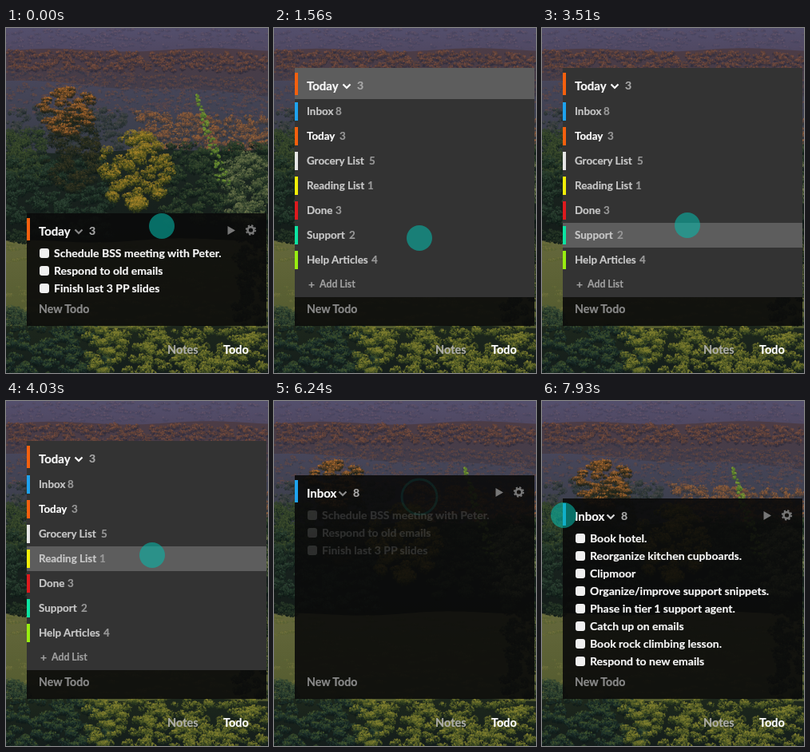
Write an HTML page with a canvas that moves like this. It is 328 px wide and 432 px high and loops after 8 s.

```html
<!DOCTYPE html>
<html lang="en">
<head>
<meta charset="utf-8">
<title>Todo lists</title>
<style>
html, body { margin: 0; width: 328px; height: 432px; overflow: hidden; background: #141c18; }
body { position: relative; font: 700 14px Lato, "Open Sans", sans-serif; color: #f8f8f8; }
canvas, svg, .abs, .t { position: absolute; }
canvas { left: 0; top: 0; }
.t { line-height: 20px; margin-top: -10px; white-space: nowrap; -webkit-text-stroke: .2px; }
#panel { left: 26px; width: 300px; overflow: hidden; background: rgba(10, 10, 10, .9); }
#todos, #menu, #head { left: 0; top: 0; width: 300px; }
.box { left: 16px; width: 12px; height: 12px; border-radius: 3px; background: #f0f0f0; }
#menu { height: 287px; background: #333; }
.row { left: 0; width: 100%; height: 31px; font-size: 13.4px; color: #c8c8c8; }
.row.on, #cap.on { background: #5d5d5d; }
.tag { left: 0; top: 4px; width: 4px; height: 23px; }
.num { color: #999; }
#cap { left: 0; top: 0; width: 100%; height: 39px; }
#strip { right: 0; top: 0; width: 13px; height: 100%; background: #141414; }
#bar { left: 0; top: 6px; width: 4px; height: 28px; }
#head { font-size: 15px; }
#count { font-size: 14px; color: #aaa; }
#dot, #ring { border-radius: 50%; box-sizing: border-box; transform: translate(-50%, -50%); }
#dot { width: 32px; height: 32px; background: rgba(5, 184, 170, .57); }
#ring { border: 3px solid rgb(5, 184, 170); }
.tab { top: 402.500px; font-size: 14.500px; }
</style>
</head>
<body>
<canvas id="scene" width="328" height="432"></canvas>
<div id="panel" class="abs">
  <div id="todos" class="abs"></div>
  <div class="t" id="add" style="left:15px;font-size:14.2px;color:#8a8a8a">New Todo</div>
  <svg id="icons" width="60" height="40" style="left:240px;top:0" fill="#777">
    <path d="M11.500 16V27L21 21.500Z"/>
    <g fill="none" stroke="#777">
      <circle cx="40.500" cy="21" r="3.900" stroke-width="2.600"/>
      <circle cx="40.500" cy="21" r="5.700" stroke-width="2" stroke-dasharray="2.240"/>
    </g>
  </svg>
  <div id="menu" class="abs"><div id="cap" class="abs"></div></div>
  <div id="strip" class="abs"></div>
  <div id="head" class="abs">
    <div id="bar" class="abs"></div>
    <div id="title" class="t" style="left:15px;top:22px"></div>
    <svg id="chev" width="12" height="8" style="top:19px" fill="none" stroke-width="2.200"><path d="M1.500 1.500L6 6L10.500 1.500"/></svg>
    <div id="count" class="t" style="top:22px"></div>
  </div>
</div>
<div class="t tab" style="left:202px;color:#adada8">Notes</div>
<div class="t tab" style="left:272px;color:#fff">Todo</div>
<div id="ring" class="abs"></div>
<div id="dot" class="abs"></div>
<script>
const $ = id => document.getElementById(id);
const LOOP = 8000, STEP = 130, BOTTOM = 373;
const OPEN = 1170, PICK = 5980;

// ---------- landscape ----------
const g = $('scene').getContext('2d');
let seed = 11;
const rnd = () => (seed = (seed * 16807) % 2147483647) / 2147483647;

// a filled shape down to the given floor, its top edge a line with a slight wave
function land(yLeft, yRight, floor, top, bottom) {
  const grad = g.createLinearGradient(0, Math.min(yLeft, yRight), 0, floor);
  grad.addColorStop(0, top);
  grad.addColorStop(1, bottom);
  g.fillStyle = grad;
  g.beginPath();
  g.moveTo(0, floor);
  for (let x = 0; x <= 328; x += 4) g.lineTo(x, yLeft + (yRight - yLeft) * x / 328 + 2 * Math.sin(x / 31 + yLeft));
  g.lineTo(328, floor);
  g.fill();
}
// tiny leaves, colours run from the lit top to the shaded foot
function clump(x, y, r, colors, flat) {
  const n = 6 + r * r * 1.3;
  for (let i = 0; i < n; i++) {
    const a = rnd() * 6.283, d = Math.sqrt(rnd());
    const lit = (Math.sin(a) * d + 1) / 2 * .8 + rnd() * .4 - .1;
    g.fillStyle = colors[Math.floor(Math.min(.99, Math.max(0, lit)) * colors.length)];
    g.globalAlpha = .45 + rnd() * .4;
    g.beginPath();
    g.ellipse(x + Math.cos(a) * d * r, y + Math.sin(a) * d * r * flat, .6 + rnd(), .4 + rnd() * .6, rnd() * 3, 0, 7);
    g.fill();
  }
  g.globalAlpha = 1;
}
// clumps from back to front in a box; round boxes keep to the inscribed ellipse
function woods(x0, y0, x1, y1, n, r, colors, { round = false, flat = .75, slope = 0 } = {}) {
  const list = colors.split(' ');
  for (let i = 0; i < n; i++) {
    const v = (i + rnd()) / n;
    const half = round ? Math.sqrt(Math.max(0, 1 - (2 * v - 1) ** 2)) : 1;
    const u = .5 + (rnd() - .5) * half;
    clump(x0 + (x1 - x0) * u, y0 + (y1 - y0) * v + slope * u, r * (.6 + rnd() * .8), list, flat);
  }
}
function paint() {
  land(-4, -4, 50, '#54506e', '#4d435a');
  woods(0, 2, 328, 25, 230, 3, '#65566b #564d66 #494661 #4d4961', { flat: .4 });
  land(28, 27, 90, '#4c3c46', '#413d4a');
  woods(0, 28, 328, 52, 420, 3.2, '#7a5042 #664539 #4b3b40 #343142 #2f2e3c', { slope: 4 });
  woods(0, 50, 328, 70, 300, 3, '#62473f #54434a #3e3c4c #373847', { slope: 14 });
  land(66, 84, 160, '#47465a', '#373c46');
  woods(0, 68, 328, 106, 420, 3.2, '#654c45 #544650 #444659 #383c4b', { slope: 10, flat: .5 });
  woods(0, 100, 150, 150, 180, 4, '#49494a #38413f #2b3434 #202a2a');
  woods(160, 105, 328, 150, 330, 4, '#9a653c #7c5338 #54443f #3a3b42 #2d3235', { slope: 8 });
  land(156, 152, 272, '#1d2823', '#131b18');
  woods(0, 130, 48, 190, 110, 6, '#40502f #30402a #202f26 #15201d');
  woods(0, 165, 130, 264, 210, 6, '#304536 #233629 #17251f #0f1917');
  woods(50, 110, 122, 205, 110, 6, '#3c3a24 #292e20 #1b241c #121a18', { round: true });
  woods(42, 76, 114, 133, 85, 6, '#ae6c30 #78502a #44351f #25281d #1b211c', { round: true, flat: .45 });
  woods(195, 145, 328, 245, 230, 6, '#3c4c31 #283b29 #192820 #101a18');
  woods(118, 133, 205, 226, 115, 7, '#a8862b #806f25 #57581f #353e1d #202918', { round: true });
  woods(268, 160, 336, 245, 100, 6, '#737a51 #515f3d #35452f #222f25 #18221f', { round: true });
  for (let i = 0; i < 75; i++) {
    const p = rnd();
    clump(238 + 36 * p + (rnd() - .5) * (3 + 12 * p), 84 + 112 * p, 1.800, ['#7f9c36', '#5e8130', '#3d5d2b'], .8);
  }
  land(268, 264, 376, '#65683c', '#525a2e');
  woods(0, 270, 328, 366, 260, 6, '#74733f #656a3a #596236 #686a37', { flat: .2 });
  woods(0, 255, 26, 268, 22, 4, '#2a3a29 #1a271f #121d19');
  woods(288, 250, 328, 372, 90, 6, '#304028 #1d2b20 #131d19');
  woods(0, 352, 26, 385, 30, 6, '#44573a #2c4030 #1a2a26 #13201f');
  land(374, 374, 432, '#1d271c', '#141d1b');
  woods(0, 374, 130, 434, 130, 6, '#46572f #2f4530 #1d302d #14211f #101a19');
  woods(100, 374, 328, 434, 240, 6, '#8b8733 #6a702c #465225 #2b3922 #19241b');
}
paint();

// ---------- lists ----------
function el(parent, cls, style, text = '') {
  const node = document.createElement('div');
  node.className = cls;
  node.style.cssText = style;
  node.textContent = text;
  parent.append(node);
  return node;
}
function todoList(lines) {
  const list = el($('todos'), 'abs', 'left:0;top:0');
  lines.forEach((line, i) => {
    const y = 50 + 22 * i;
    el(list, 'abs box', `top:${y - 6}px`);
    el(list, 't', `left:34px;top:${y}px`, line);
  });
  return list;
}
const todayList = todoList(['Schedule BSS meeting with Peter.', 'Respond to old emails', 'Finish last 3 PP slides']);
const inboxList = todoList(['Book hotel.', 'Reorganize kitchen cupboards.', 'Clipmoor', 'Organize/improve support snippets.',
  'Phase in tier 1 support agent.', 'Catch up on emails', 'Book rock climbing lesson.', 'Respond to new emails']);

// name, count, left of count, colour
const rows = [
  ['Inbox', 8, 51, '#1ea2ee'], ['Today', 3, 56, '#f4600e'], ['Grocery List', 5, 93, '#e6e6e6'],
  ['Reading List', 1, 91, '#f2ee08'], ['Done', 3, 51, '#de1a1e'], ['Support', 2, 68, '#0ce4a2'],
  ['Help Articles', 4, 96, '#98ee10'],
].map(([name, n, x, color], i) => {
  const row = el($('menu'), 'abs row', `top:${39 + 31 * i}px`);
  el(row, 'abs tag', `background:${color}`);
  el(row, 't', `left:15px;top:15px;${name === 'Today' ? 'color:#fff' : ''}`, name);
  el(row, 't num', `left:${x}px;top:15px`, n);
  return row;
});
const addRow = el($('menu'), 'abs row', 'top:256px;font-size:12.3px;color:#a0a0a0');
el(addRow, 't', 'left:17px;top:15px;font-size:14px', '+');
el(addRow, 't', 'left:31px;top:15px', 'Add List');

// ---------- motion: [time, values...] ----------
const cursor = [[0, 195, 248], [390, 185, 259], [780, 182, 263], [1950, 182, 263], [2470, 182, 292], [2860, 182, 292],
  [3250, 182, 270], [3770, 182, 223], [4030, 183, 193], [4680, 183, 142], [5200, 183, 104], [5850, 183, 104],
  [6240, 182, 120], [6760, 182, 121], [7150, 138, 127], [7670, 37, 143], [7930, 27, 143]];
const panelTop = [[1170, 232], [1300, 198], [1430, 84], [1560, 50], [5980, 50], [6110, 64], [6240, 93], [6370, 114], [6500, 122]];
const oldAlpha = [[5980, 1], [6110, .55], [6240, .14], [6370, 0]];
const newAlpha = [[6240, 0], [6760, 1]];
const glow = [[0, 135], [780, 255], [5980, 255], [6110, 140], [6760, 140], [7280, 215]];

function at(track, t, k = 1) {
  const i = track.findIndex(key => key[0] > t);
  if (i < 0) return track[track.length - 1][k];
  if (!i) return track[0][k];
  const a = track[i - 1], b = track[i];
  return a[k] + (b[k] - a[k]) * (t - a[0]) / (b[0] - a[0]);
}
const show = (node, on) => { node.style.visibility = on ? 'visible' : 'hidden'; };

function render(t) {
  const x = at(cursor, t, 1), y = at(cursor, t, 2), top = at(panelTop, t);
  const menuOpen = t >= OPEN && t < PICK + STEP, inbox = t >= PICK + STEP;

  $('panel').style.top = top + 'px';
  $('panel').style.height = BOTTOM - top + 'px';
  $('add').style.top = 352 - top + 'px';
  show($('menu'), menuOpen);
  show($('icons'), !menuOpen);
  show($('todos'), !menuOpen);
  show($('strip'), menuOpen && top > 50);
  todayList.style.opacity = at(oldAlpha, t);
  inboxList.style.opacity = at(newAlpha, t);

  // the header keeps its highlight until the pointer moves again
  const hover = t < 2080 ? -1 : Math.floor((y - 89) / 31);
  $('cap').classList.toggle('on', hover < 0);
  rows.forEach((row, i) => row.classList.toggle('on', i === hover));

  $('title').textContent = inbox ? 'Inbox' : 'Today';
  $('count').textContent = inbox ? 8 : 3;
  $('count').style.left = (inbox ? 73 : 78) + 'px';
  $('chev').style.left = (inbox ? 54 : 59) + 'px';
  $('bar').style.background = inbox ? '#1ea2ee' : '#f4600e';
  const c = Math.round(at(glow, t));
  $('chev').style.stroke = `rgb(${c},${c},${c})`;

  const phase = (t - (t < 3000 ? OPEN : PICK)) / STEP;
  const tapped = phase >= 1 && phase < 3;
  for (const id of ['dot', 'ring']) {
    $(id).style.left = x + 'px';
    $(id).style.top = y + 'px';
  }
  show($('dot'), !tapped);
  show($('ring'), tapped);
  const size = phase < 2 ? 44 : 47;
  $('ring').style.width = $('ring').style.height = size + 'px';
  $('ring').style.opacity = phase < 2 ? .22 : .1;
}

const start = performance.now();
function tick() {
  const t = (performance.now() - start) % LOOP;
  render(Math.floor(t / STEP) * STEP);
  requestAnimationFrame(tick);
}
tick();
</script>
</body>
</html>
```
